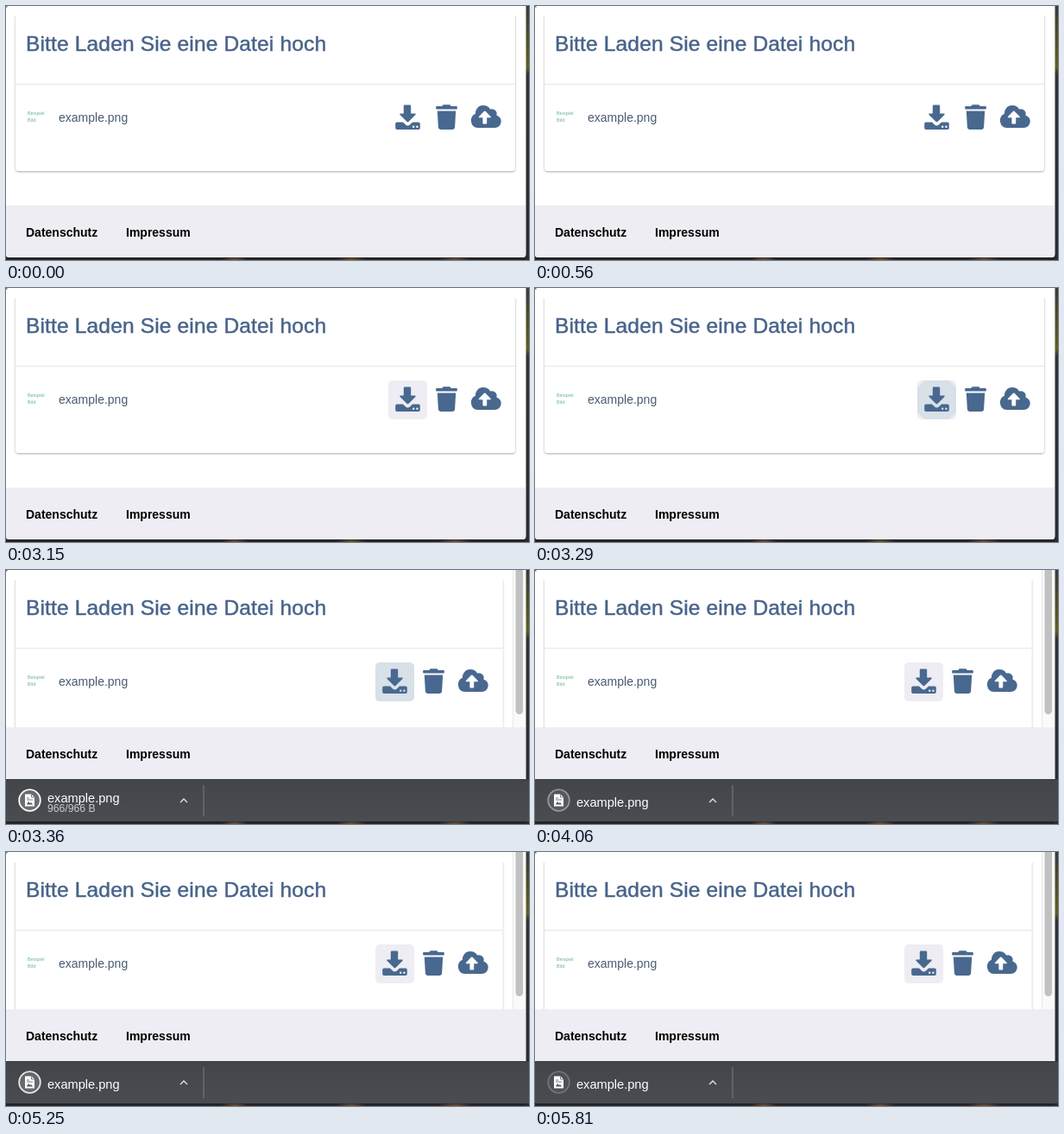
These frames come from a looping animation (606x294 px, 5880 ms). An HTML page:

```html
<!DOCTYPE html>
<html lang="de">
<head>
<meta charset="utf-8">
<title>Datei hochladen</title>
<style>
  html, body { margin: 0; width: 100%; height: 100%; overflow: hidden; background: #fff; }
  svg { display: block; font-family: "Liberation Sans", Arial, sans-serif; }
  .icon { fill: #49688f; }
  .title { font-size: 24.5px; letter-spacing: .16px; fill: #48648b; stroke: #48648b; stroke-width: .5px; }
  .name { font-size: 14px; fill: #4a5b73; }
  .thumb { font: 5.4px "Noto Sans", sans-serif; fill: #62b588; }
  .links { font-size: 14px; font-weight: bold; }
  .file { font-size: 14.6px; fill: #fff; }
  .status { font-size: 12.2px; fill: #c9cbcd; }
</style>
</head>
<body>
<svg width="606" height="294" viewBox="0 0 606 294">
  <defs>
    <linearGradient id="edge" x1="0" y1="0" x2="0" y2="1">
      <stop offset="0" stop-color="#393a3e"/>
      <stop offset=".1" stop-color="#4b4a28"/>
      <stop offset=".24" stop-color="#625f1f"/>
      <stop offset=".27" stop-color="#303237"/>
      <stop offset="1" stop-color="#292b30"/>
    </linearGradient>
    <linearGradient id="bar" x1="0" y1="0" x2="0" y2="1">
      <stop offset="0" stop-color="#424549"/>
      <stop offset="1" stop-color="#494c50"/>
    </linearGradient>
    <radialGradient id="glow">
      <stop offset="0" stop-color="#7a5436"/>
      <stop offset="1" stop-color="#7a5436" stop-opacity="0"/>
    </radialGradient>
    <filter id="shade" x="-5%" y="-5%" width="110%" height="115%">
      <feDropShadow dx="0" dy="1" stdDeviation=".8" flood-color="#000" flood-opacity=".35"/>
    </filter>
    <clipPath id="button"><rect x="443" y="107" width="45" height="45" rx="5"/></clipPath>
    <clipPath id="view"><rect y="12" width="602" height="279"/></clipPath>
  </defs>

  <!-- desktop and window -->
  <rect width="606" height="294" fill="#242428"/>
  <rect x="602" width="4" height="294" fill="url(#edge)"/>
  <g fill="url(#glow)">
    <ellipse cx="265" cy="294" rx="16" ry="4"/>
    <ellipse cx="400" cy="294" rx="18" ry="4"/>
    <ellipse cx="520" cy="294" rx="20" ry="4"/>
  </g>
  <rect y="-6" width="602.5" height="297" rx="4" fill="#fff"/>
  <rect width="1.5" height="1.5" fill="#666"/>

  <!-- upload card -->
  <g clip-path="url(#view)">
    <rect id="card" x="11" y="0" width="579" height="191" rx="4" fill="#fff" filter="url(#shade)"/>
    <rect id="rule" x="11" y="90" width="579" height="1" fill="#e4e6e9"/>
  </g>
  <text class="title" x="23" y="52">Bitte Laden Sie eine Datei hoch</text>
  <text class="thumb" x="25" y="126">Beispiel</text>
  <text class="thumb" x="25" y="134">Bild</text>
  <text class="name" x="61" y="134">example.png</text>

  <g id="tools" class="icon">
    <g id="press" clip-path="url(#button)">
      <rect x="443" y="107" width="45" height="45" fill="#ededf3"/>
      <circle id="ripple" cx="465.5" cy="129.5" fill="#d8e0e8"/>
    </g>
    <path d="M463 114.5h5q1.2 0 1.2 1.2v8.8h4.6q1.8 0 .6 1.4l-8 8q-.9.8-1.8 0l-8-8q-1.2-1.4.6-1.4h3.6v-8.8q0-1.2 1.2-1.2z"/>
    <path fill-rule="evenodd" d="M453 134.5h7l3.4 3.2q2.1 1.6 4.2 0l3.4-3.2h7q1.8 0 1.8 1.8v5q0 1.7-1.8 1.7h-25q-1.8 0-1.8-1.7v-5q0-1.8 1.8-1.8z
      M471 139.8a1.2 1.2 0 1 0 2.4 0a1.2 1.2 0 1 0-2.4 0z M475.2 139.8a1.2 1.2 0 1 0 2.4 0a1.2 1.2 0 1 0-2.4 0z"/>
    <path d="M499 116h6.3l.7-1.2q.4-.6 1.1-.6h6.8q.7 0 1.1.6l.7 1.2h6.3q.8 0 .8.8v2q0 .8-.8.8h-23q-.8 0-.8-.8v-2q0-.8.8-.8z
      M499.8 121.4h21.4l-1.1 19.2q-.2 2.4-2.6 2.4h-14q-2.4 0-2.6-2.4z"/>
    <path d="M546.5 141a8.5 8.5 0 0 1-2.6-16.2a9.2 9.2 0 0 1 17.2-5.2a5.6 5.6 0 0 1 7.3 6.9a7.4 7.4 0 0 1-2 14.5z"/>
    <path fill="#fff" d="M554 121.8q.8-.7 1.6 0l6 6.1q.9 1.3-.6 1.3h-3.8v6.3q0 .9-.9.9h-3q-.9 0-.9-.9v-6.3h-3.8q-1.5 0-.6-1.3z"/>
  </g>

  <g id="scroll">
    <rect x="587" width="15" height="242" fill="#fafafa"/>
    <rect x="587" width="1" height="242" fill="#e8e8e8"/>
    <rect x="590.5" y="-10" width="8.5" height="177" rx="4.2" fill="#c1c1c1"/>
  </g>

  <g id="footer">
    <path d="M0 231H602V288q0 3-3 3H3q-3 0-3-3z" fill="#ededf3"/>
    <g class="links">
      <text x="23" y="267">Datenschutz</text>
      <text x="139" y="267">Impressum</text>
    </g>
  </g>

  <!-- download shelf -->
  <g id="shelf">
    <path d="M0 242H606V291H3q-3 0-3-3z" fill="url(#bar)"/>
    <rect y="242" width="606" height="1" fill="#3a3d40"/>
    <circle id="ring" cx="27.5" cy="266.5" r="12.3" fill="#fff" fill-opacity=".2" stroke="#fff" stroke-width="1.8"/>
    <path d="M22 259.5h7.5l3.5 3.5v10.5h-11z" fill="#fff"/>
    <path d="M29.5 259.5v3.5h3.5M24 264h3M24 266h7" fill="none" stroke="#6a6d70" stroke-width=".9"/>
    <path d="M23.7 271.5l2.5-3.4 1.7 1.8 1.2-1 2 2.6z" fill="#55585c"/>
    <text id="file" class="file" x="48">example.png</text>
    <text id="status" class="status" x="48" y="280">966/966 B</text>
    <path d="M202 269l4-4 4 4" fill="none" stroke="#e0e1e2" stroke-width="1.4"/>
    <rect x="228.5" y="249" width="1" height="36" fill="#7b7e81"/>
  </g>
</svg>
<script>
  const LOOP = 5880, PRESS = 3150, DONE = 3360;
  const el = id => document.getElementById(id);
  const set = (id, name, value) => el(id).setAttribute(name, value);
  const show = (id, on) => set(id, 'visibility', on ? 'visible' : 'hidden');
  const span = (t, a, b) => Math.min(1, Math.max(0, (t - a) / (b - a)));
  const ease = p => p * p * (3 - 2 * p);

  function draw(t) {
    const done = t >= DONE;
    show('press', t >= PRESS);
    show('scroll', done);
    show('shelf', done);

    // the shelf takes 49px of height, the scrollbar 15px of width
    for (const id of ['card', 'rule']) set(id, 'width', done ? 564.5 : 579);
    set('tools', 'transform', `translate(${done ? -15 : 0} 0)`);
    set('footer', 'transform', `translate(0 ${done ? -49 : 0})`);

    set('ripple', 'r', 32 * Math.sqrt(span(t, PRESS, DONE)));
    set('ripple', 'opacity', 1 - span(t, 3400, 3700));

    const tuck = ease(span(t, 3400, 3700));
    set('file', 'y', 268.5 + 5.5 * tuck);
    set('status', 'opacity', 1 - tuck);

    // two and a half pulses, ending dim
    const pulse = .5 + .5 * Math.cos(5 * Math.PI * span(t, 3380, 5880));
    set('ring', 'opacity', .2 + .8 * pulse);
  }

  const start = performance.now();
  function tick() {
    draw((performance.now() - start) % LOOP);
    requestAnimationFrame(tick);
  }
  tick();
</script>
</body>
</html>
```
